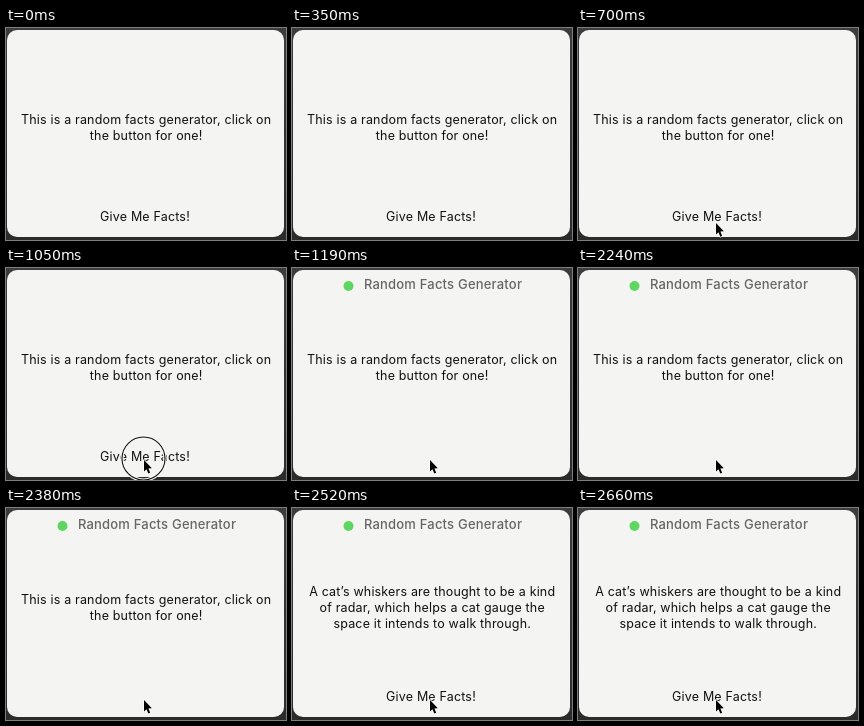
Write an HTML page with a canvas that moves like this. It is 280x212 px and loops after 2730 ms.

```html
<!DOCTYPE html>
<html lang="en">
<head>
<meta charset="utf-8">
<title>Random Facts Generator</title>
<style>
  html, body { margin: 0; width: 100%; height: 100%; overflow: hidden; background: #333; }
  canvas { display: block; width: 280px; height: 212px; }
</style>
</head>
<body>
<canvas id="stage"></canvas>
<script>
const WIDTH = 280, HEIGHT = 212, LOOP = 2730;
const TIMES = { cursorIn: 630, press: 980, activate: 1120, release: 1190, answer: 2520 };
const INTRO = ['This is a random facts generator, click on', 'the button for one!'];
const FACT = [
  'A cat’s whiskers are thought to be a kind',
  'of radar, which helps a cat gauge the',
  'space it intends to walk through.'
];

const canvas = document.getElementById('stage');
const ctx = canvas.getContext('2d');
const scale = window.devicePixelRatio || 1;
canvas.width = WIDTH * scale;
canvas.height = HEIGHT * scale;
ctx.scale(scale, scale);

function label(text, x, y, color = '#111', font = '400 12.5px', spacing = 0.17) {
  ctx.font = `${font} Inter, sans-serif`;
  ctx.letterSpacing = `${spacing}px`;
  ctx.textAlign = 'center';
  ctx.fillStyle = color;
  ctx.fillText(text, x, y);
}

function paragraph(lines) {
  const first = 104 - (lines.length - 1) * 8;
  lines.forEach((line, i) => label(line, 140.2, first + i * 16));
}

function disc(x, y, r) {
  ctx.beginPath();
  ctx.arc(x, y, r, 0, Math.PI * 2);
}

function stroke(color, width) {
  ctx.strokeStyle = color;
  ctx.lineWidth = width;
  ctx.stroke();
}

function drawWindow() {
  const backdrop = ctx.createLinearGradient(0, 0, 0, HEIGHT);
  backdrop.addColorStop(0, '#3c3c3c');
  backdrop.addColorStop(1, '#2b2b2b');
  ctx.fillStyle = backdrop;
  ctx.fillRect(0, 0, WIDTH, HEIGHT);
  ctx.fillStyle = '#f4f4f3';
  ctx.beginPath();
  ctx.roundRect(1, 2, 277, 207, 10);
  ctx.fill();
}

function drawTitle() {
  ctx.fillStyle = '#5fd662';
  disc(56.5, 18, 5);
  ctx.fill();
  label('Random Facts Generator', 151, 21, '#666', '500 13px', 0.2);
}

// A pale halo keeps the ring legible over text and the dark backdrop.
function drawClickRing() {
  disc(137.5, 190.5, 21.5);
  stroke('#f8f8f8', 3.2);
  stroke('#111', 1.1);
}

function drawCursor(x, y) {
  const outline = [[0, 0], [0, 11.5], [2.5, 9.2], [4.3, 13.6], [6.2, 12.8], [4.4, 8.5], [7.9, 8.2]];
  ctx.beginPath();
  outline.forEach(([dx, dy]) => ctx.lineTo(x + dx, y + dy));
  ctx.closePath();
  ctx.lineJoin = 'round';
  stroke('#fff', 1.6);
  ctx.fillStyle = '#000';
  ctx.fill();
}

function cursorTip(t) {
  const step = Math.min(3, Math.floor((t - TIMES.cursorIn) / 70));
  return 192 + 7 * (1 - step / 3) ** 2;
}

function draw(t) {
  const waiting = t >= TIMES.release && t < TIMES.answer;
  drawWindow();
  if (t >= TIMES.activate) drawTitle();
  paragraph(t < TIMES.answer ? INTRO : FACT);
  if (!waiting) label('Give Me Facts!', 139, 193);
  if (t >= TIMES.press && t < TIMES.release) drawClickRing();
  if (t >= TIMES.cursorIn) drawCursor(138, cursorTip(t));
}

const start = performance.now();
function tick() {
  draw((performance.now() - start) % LOOP);
  requestAnimationFrame(tick);
}
tick();
</script>
</body>
</html>
```
